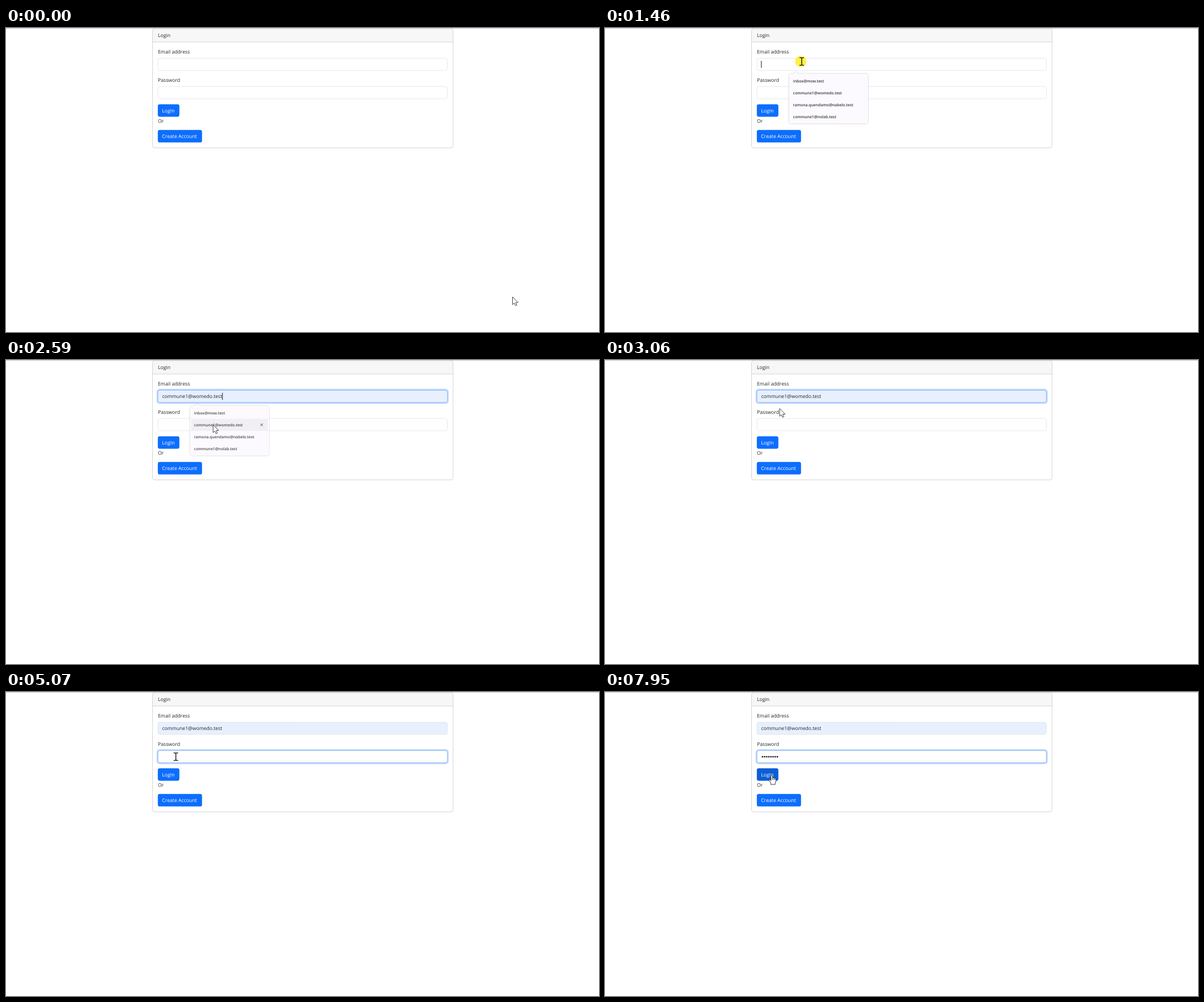
These frames come from a looping animation (1046x536 px, 8 s). An HTML page:

```html
<!DOCTYPE html>
<html lang="en">
<head>
<meta charset="utf-8">
<title>Login form</title>
<style>
  html, body { margin: 0; width: 100%; height: 100%; overflow: hidden; background: #fff; }
  svg { display: block; width: 100%; height: 100%; }
  text { font: 8.7px "Open Sans", "Noto Sans", sans-serif; fill: #212529; text-rendering: geometricPrecision; }
  .button { fill: #0d6efd; }
  .onButton { fill: #fff; }
  .box { fill: #fff; stroke: #dee2e6; stroke-width: .8; }
  .ring { fill: none; }
  #value { font-size: 8.6px; }
  #menu text { font-size: 6.8px; font-weight: 600; fill: #333; }
</style>
</head>
<body>
<svg viewBox="0 0 1046 536">
  <rect width="1046" height="1" fill="#b5c5d8"/>
  <rect x="258.5" y="1" width="530" height="210.3" rx="3.5" fill="#fff"/>
  <path d="M258.5 24.7V4.5a3.5 3.5 0 0 1 3.5-3.5h523a3.5 3.5 0 0 1 3.5 3.5v20.2z" fill="#f7f7f7"/>
  <path d="M258.5 24.7h530" stroke="#d4d4d4"/>
  <rect x="258.5" y="1" width="530" height="210.3" rx="3.5" fill="none" stroke="#d4d4d4"/>
  <text x="268" y="16.4">Login</text>
  <text x="268" y="44.9">Email address</text>
  <text x="268" y="94.7">Password</text>
  <text x="268" y="166.9">Or</text>
  <g id="fields"></g>
  <text id="value" x="275.5" y="67.3"></text>
  <g id="dots"></g>
  <rect id="caret" width="1" height="12.5" fill="#111"/>
  <rect id="login" class="button" x="267.8" y="134.4" width="38" height="22" rx="3.4"/>
  <text class="onButton" x="275.3" y="148.9">LogIn</text>
  <rect class="button" x="267.8" y="179.8" width="78" height="22" rx="3.4"/>
  <text class="onButton" x="275.3" y="194.2">Create Account</text>
  <g id="menu">
    <path d="M324.5 84.5a4 4 0 0 1 4-4h5l3.5-3.5 3.5 3.5h119.500a4 4 0 0 1 4 4v80a4 4 0 0 1-4 4h-131.500a4 4 0 0 1-4-4z"
      fill="#fcfaff" style="filter:drop-shadow(0 .7px 1.2px #0004)"/>
    <g id="hover">
      <rect x="326.500" y="-10.500" width="135.500" height="21" fill="#f0edf3"/>
      <path d="M448.800-2.200l4.400 4.400m0-4.400l-4.400 4.400" stroke="#444"/>
    </g>
  </g>
  <circle id="press" r="10" fill="#fff033" opacity=".9"/>
  <g id="pointer" stroke-linejoin="round">
    <path id="arrow" d="M0 0V13.700L3.100 10.900 5.100 15.500 7.500 14.500 5.500 10H9.800Z" fill="#fff" stroke="#333" stroke-width=".9"/>
    <path id="beam" d="M-4-6.600H-1.200L0-6 1.200-6.600H4M0-6V6M-4 6.600H-1.200L0 6 1.200 6.600H4" fill="none" stroke="#111" stroke-width="1.400"/>
    <path id="hand" d="M-1.300 1V10.200L-3.200 8.400Q-4.800 7.600-5 9.300L-1.600 14.300V17H6.200V14.300L7.700 10.600V6.700Q7.100 5.300 5.900 6V5.500Q4.800 4.600 3.800 5.300V5Q2.800 4.200 1.400 5V1Q0-1-1.300 1ZM1.400 5V9M3.800 5.300V9M5.900 6V9"
      fill="#fff" stroke="#222" stroke-width=".9"/>
  </g>
</svg>
<script>
const $ = id => document.getElementById(id);
const LOOP = 8000;
const CLICK_EMAIL = 1460, PREVIEW = 2050, CLICK_ITEM = 2460, COMMIT = 2530, CLICK_PASSWORD = 4540;
const KEYS = [5540, 5800, 6070, 6210, 6410, 6740, 6890, 7090];
const PRESSES = [[CLICK_EMAIL, 130], [CLICK_ITEM, 70], [CLICK_PASSWORD, 70]];
const EMAILS = ["inbox@mow.test", "commune1@womedo.test", "ramona.quendamo@nabelo.test", "commune1@nolab.test"];

// Pointer moves: first step, last step, number of steps, x, y
const START = [893.5, 474];
const MOVES = [
  [70, 590, 9, 346, 58],
  [860, 860, 1, 347, 59],
  [1920, 1980, 2, 353.7, 84.7],
  [2050, 2320, 5, 365.3, 114.3],
  [2660, 3200, 9, 288, 75.5],
  [3270, 3270, 1, 284, 72],
  [3420, 3950, 8, 324, 73],
  [4010, 4210, 4, 299.6, 114],
  [7680, 7950, 4, 294, 146]
];

const clamp = v => Math.max(0, Math.min(1, v));
const ramp = (t, start, length) => clamp((t - start) / length);
const show = (id, on) => $(id).setAttribute("visibility", on ? "inherit" : "hidden");
const place = (id, x, y) => $(id).setAttribute("transform", `translate(${x} ${y})`);

const field = (id, y) => `
  <rect id="${id}" class="box" x="268" y="${y}" width="510.500" height="21.600" rx="3.400"/>
  <g id="${id}Ring" class="ring">
    <rect x="266.700" y="${y - 1.3}" width="513.100" height="24.200" rx="4.500" stroke="#0d6efd" stroke-opacity=".25" stroke-width="2.300"/>
    <rect x="268" y="${y}" width="510.500" height="21.600" rx="3.400" stroke="#86b7fe" stroke-width=".9"/>
  </g>`;
$("fields").innerHTML = field("email", 53.3) + field("password", 103.2);
$("dots").innerHTML = KEYS.map((_, i) => `<circle cx="${277.7 + 3.75 * i}" cy="114.200" r="1.350" fill="#212529"/>`).join("");
$("menu").insertAdjacentHTML("beforeend", EMAILS.map((mail, i) => `<text x="331.800" y="${95.8 + 20.9 * i}">${mail}</text>`).join(""));

function pointerAt(t) {
  let [x, y] = START;
  for (const [first, last, steps, toX, toY] of MOVES) {
    if (t < first) break;
    const gap = (last - first) / (steps - 1) || 1;
    const p = Math.min(1, (Math.floor((t - first) / gap + 1e-6) + 1) / steps);
    const eased = p * p * (3 - 2 * p);
    x += (toX - x) * eased;
    y += (toY - y) * eased;
  }
  return [x, y];
}

function pointerKind(x, y, menuOpen) {
  const inside = (left, top, right, bottom) => x > left && x < right && y > top && y < bottom;
  if (menuOpen && inside(324, 80, 464, 169)) return "arrow";
  if (inside(268, 53, 779, 75) || inside(268, 103, 779, 125)) return "beam";
  return inside(268, 134, 306, 157) ? "hand" : "arrow";
}

function drawCaret(t, typed) {
  const restart = [CLICK_EMAIL, COMMIT, CLICK_PASSWORD, ...KEYS].filter(k => k <= t).pop();
  const previewing = t >= PREVIEW && t < COMMIT;
  show("caret", restart !== undefined && !previewing && Math.floor((t - restart) / 520) % 2 === 0);
  if (t >= CLICK_PASSWORD) place("caret", 275.3 + 3.75 * typed, 107.8);
  else place("caret", 275.3 + (t >= COMMIT ? $("value").getComputedTextLength() + .3 : 0), 57.8);
}

function draw(t) {
  const [x, y] = pointerAt(t);
  const menuOpacity = t < CLICK_EMAIL ? 0 : 1 - ramp(t, 2570, 200);
  const hoverRow = t < PREVIEW ? -1 : t < CLICK_ITEM && y < 104 ? 0 : 1;

  const kind = pointerKind(x, y, menuOpacity > 0);
  for (const id of ["arrow", "beam", "hand"]) show(id, id === kind);
  place("pointer", x, y);
  show("press", PRESSES.some(([start, length]) => t >= start && t < start + length));
  place("press", x - 1.8, y);

  $("menu").setAttribute("opacity", menuOpacity);
  show("menu", menuOpacity > 0);
  show("hover", hoverRow >= 0);
  place("hover", 0, 93.4 + 20.9 * Math.max(0, hoverRow));

  $("value").textContent = EMAILS[hoverRow] || "";
  $("email").style.fill = hoverRow < 0 ? "#fff" : "#e8f0fe";
  const toPassword = ramp(t, CLICK_PASSWORD, 140);
  $("emailRing").setAttribute("opacity", ramp(t, CLICK_EMAIL, 140) - toPassword);
  $("passwordRing").setAttribute("opacity", toPassword);

  const typed = KEYS.filter(k => k <= t).length;
  [...$("dots").children].forEach((dot, i) => dot.setAttribute("visibility", i < typed ? "visible" : "hidden"));
  drawCaret(t, typed);

  const hot = ramp(t, 7800, 150);
  $("login").style.fill = `rgb(${13 - 2 * hot},${110 - 16 * hot},${253 - 38 * hot})`;
}

const begin = performance.now();
function tick() {
  draw((performance.now() - begin) % LOOP);
  requestAnimationFrame(tick);
}
tick();
</script>
</body>
</html>
```
